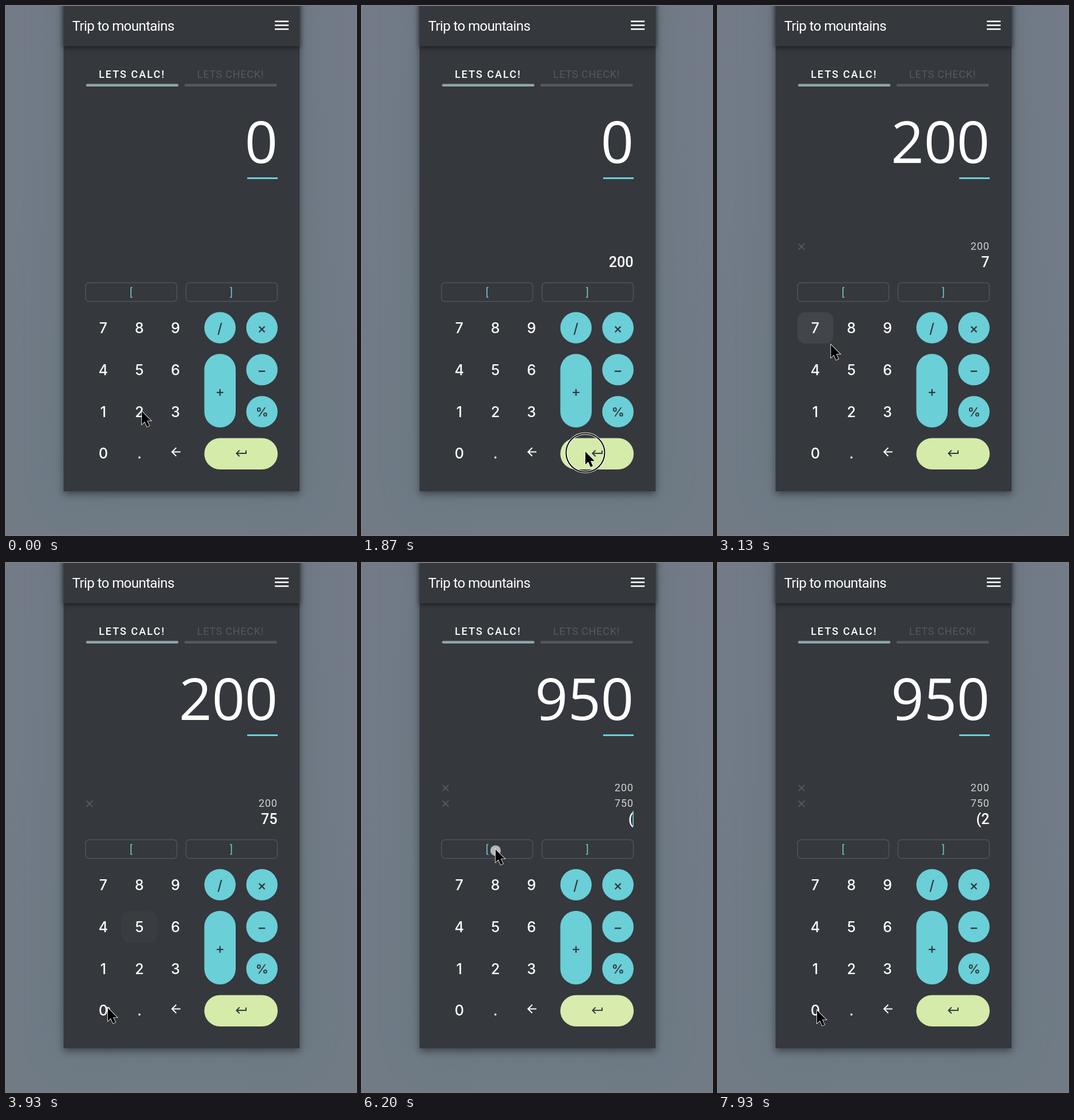
Write an HTML page that moves like this. It is 608 px wide and 920 px high and loops after 8 s.

```html
<!DOCTYPE html>
<html lang="en">
<head>
<meta charset="utf-8">
<title>Trip calculator</title>
<style>
html, body { margin: 0; width: 100%; height: 100%; overflow: hidden; }
body { position: relative; background: linear-gradient(#737b88, #707b86); }
.card, .head { position: absolute; left: 100px; width: 410px; background: #35383d; }
.card { top: -40px; height: 884px; box-shadow: 0 5px 12px rgba(0,0,0,.42), 0 4px 60px rgba(86,108,108,.4); }
.head { top: -20px; height: 90px; box-shadow: 0 2px 8px rgba(0,0,0,.55); }
svg { position: absolute; left: 0; top: 0; }
text { font-family: Roboto, sans-serif; fill: #fff; }
.title { font-size: 24px; letter-spacing: -.62px; }
.tab { font-size: 18px; font-weight: 500; letter-spacing: 2px; }
.off { font-weight: 400; letter-spacing: .7px; fill: #55595e; }
.big { font: 100px "Open Sans", sans-serif; }
.old { font-size: 18px; letter-spacing: 1px; fill: #d0d1d3; }
.entry { font-size: 25px; font-weight: 500; }
.num { font: 500 25px Inter, sans-serif; }
.op { font: 500 24px Inter, sans-serif; fill: #34373c; }
.pct { font-size: 22px; font-weight: 600; }
.mid { text-anchor: middle; }
.end { text-anchor: end; }
.paren { font-size: 18px; fill: #6acfd7; }
.frame { fill: none; stroke: #505359; stroke-width: 1.5; }
.cyan { fill: #6acfd7; }
.cross { stroke: #55585d; stroke-width: 2; }
</style>
</head>
<body>
<div class="card"></div>
<div class="head"></div>
<svg id="stage" width="608" height="920" viewBox="0 0 608 920">
  <text class="title" x="115" y="42.5">Trip to mountains</text>
  <path d="M467 26.8h24M467 33.5h24M467 40.2h24" stroke="#fff" stroke-width="2.5"/>

  <text class="tab mid" x="219" y="125">LETS CALC!</text>
  <text class="tab off mid" x="390" y="125">LETS CHECK!</text>
  <rect x="139" y="135.5" width="160.5" height="4.5" rx="2" fill="#90a4a9"/>
  <rect x="310" y="135.5" width="160.5" height="4.5" rx="2" fill="#55585d"/>

  <text class="big end" id="result" x="472" y="273"></text>
  <rect class="cyan" x="419" y="298" width="53" height="3"/>

  <g id="log"></g>
  <text class="entry end" id="entry" x="471.5" y="453.5"></text>
  <rect class="cyan" id="caret" x="470.2" y="431" width="1.6" height="27"/>

  <rect class="frame" x="138.2" y="481.2" width="158.6" height="32.6" rx="6"/>
  <rect class="frame" x="312.8" y="481.2" width="158.6" height="32.6" rx="6"/>
  <text class="paren mid" x="217.5" y="503.5">[</text>
  <text class="paren mid" x="391.5" y="503.5">]</text>

  <g id="nums"></g>
  <path fill="#fff" transform="translate(283 763.5)" d="M20 11H7.83l5.59-5.59L12 4l-8 8 8 8 1.41-1.41L7.83 13H20z"/>

  <g class="cyan">
    <circle cx="371.75" cy="559.5" r="27.25"/>
    <circle cx="444.6" cy="559.5" r="27.25"/>
    <circle cx="444.6" cy="632.5" r="27.25"/>
    <circle cx="444.6" cy="705.5" r="27.25"/>
    <rect x="344.5" y="605" width="54.5" height="128" rx="27.25"/>
  </g>
  <text class="op mid" x="371.5" y="568.5">/</text>
  <text class="op mid" x="444.6" y="568.5">×</text>
  <text class="op mid" x="444.6" y="641.5">−</text>
  <text class="op mid" x="371.7" y="678.5">+</text>
  <text class="op pct mid" x="444.8" y="714">%</text>
  <rect x="344.5" y="751.5" width="127.5" height="54.5" rx="27.25" fill="#d5eba9"/>
  <path fill="#34373c" transform="translate(397 766)" d="M19 7v4H5.83l3.58-3.59L8 6l-6 6 6 6 1.41-1.41L5.83 13H21V7z"/>

  <g id="ripples"></g>
  <g id="ring" fill="none">
    <circle r="33.5" stroke="#fff" stroke-width="4"/>
    <circle r="33.5" stroke="#0b0b0c" stroke-width="2"/>
  </g>
  <path id="pointer" d="M0 0V22.5L5 17.8 9 26.7 13 24.9 9 16.3H16Z" stroke="#fff" stroke-width="1.6" paint-order="stroke"/>
</svg>
<script>
const LOOP = 8000;
const $ = id => document.getElementById(id);

function add(parent, tag, attrs, text = '') {
  const el = document.createElementNS('http://www.w3.org/2000/svg', tag);
  for (const k in attrs) el.setAttribute(k, attrs[k]);
  el.textContent = text;
  return parent.appendChild(el);
}

// Number pad
['789', '456', '123', '0.'].forEach((row, r) =>
  [...row].forEach((ch, c) =>
    add($('nums'), 'text', { class: 'num mid', x: 169 + c * 62.7, y: 569 + r * 72.8 }, ch)));

// Earlier entries, oldest first
const log = ['200', '750'].map(value => {
  const row = add($('log'), 'g', {});
  add(row, 'text', { class: 'old end', x: 472, y: 424 }, value);
  add(row, 'path', { class: 'cross', d: 'M139.7 413.2l10.6 10.6M150.3 413.2l-10.6 10.6' });
  return row;
});

// Button areas: x, y, width, height, radius
const key = (c, r) => [138 + c * 62.7, 532.5 + r * 73, 62.5, 54.5, 14];
const ENTER = [344.5, 751.5, 127.5, 54.5, 27.25];
const OPEN = [138, 481, 159, 33, 6];

const clicks = [
  { down: 60, up: 185, at: [236, 705], area: key(1, 2), entry: '2' },
  { down: 935, up: 1045, at: [172, 778], area: key(0, 3), entry: '20' },
  { down: 1285, up: 1380, at: [172, 778], area: key(0, 3), entry: '200' },
  { down: 1850, up: 1960, at: [388, 775], area: ENTER, life: 950, entry: '' },
  { down: 2690, up: 2800, at: [172, 560], area: key(0, 0), entry: '7' },
  { down: 3440, up: 3547, at: [233, 633], area: key(1, 1), entry: '75' },
  { down: 3815, up: 3925, at: [177, 774], area: key(0, 3), entry: '750' },
  { down: 5320, up: 5430, at: [428, 774], area: ENTER, life: 950, entry: '' },
  { down: 6065, up: 6165, at: [232, 498], area: OPEN, life: 600, entry: '(' },
  { down: 7065, up: 7180, at: [236, 705], area: key(1, 2), entry: '(2' }
];

clicks.forEach((c, i) => {
  const [x, y, width, height, rx] = c.area;
  add(add($('ripples'), 'clipPath', { id: 'area' + i }), 'rect', { x, y, width, height, rx });
  const box = add($('ripples'), 'g', { 'clip-path': `url(#area${i})` });
  c.ripple = add(box, 'circle', { cx: c.at[0], cy: c.at[1] + 2, fill: '#fff' });
});

// Pointer moves: start, end, x, y
const moves = [
  [300, 880, 172, 778],
  [1440, 1800, 388, 775],
  [2010, 2540, 172, 560],
  [2920, 3410, 233, 633],
  [3575, 3810, 177, 774],
  [3990, 4660, 428, 774],
  [5530, 6050, 232, 498],
  [6300, 6960, 236, 705],
  [7300, 7930, 172, 778]
];

const clamp = v => Math.min(1, Math.max(0, v));
const ease = v => v * v * (3 - 2 * v);
const place = (el, x, y) => el.setAttribute('transform', `translate(${x} ${y})`);
const show = (el, on) => el.setAttribute('visibility', on ? 'visible' : 'hidden');

function draw(t) {
  let x = 236, y = 705;
  for (const [from, to, nx, ny] of moves) {
    const k = ease(clamp((t - from) / (to - from)));
    x += (nx - x) * k;
    y += (ny - y) * k;
  }
  place($('pointer'), x, y);

  let entry = '', sums = 0, pressed = false;
  for (const c of clicks) {
    const age = t - c.up, u = age / (c.life || 430);
    if (age >= 30) {
      entry = c.entry;
      if (c.area === ENTER) sums++;
    }
    if (t >= c.down && age < 0) pressed = true;
    const live = u >= 0 && u < 1;
    show(c.ripple, live);
    if (live) {
      c.ripple.setAttribute('r', 3 + age * .17);
      c.ripple.setAttribute('opacity', .7 * Math.pow(1 - u, 1.6));
    }
  }
  show($('ring'), pressed);
  place($('ring'), x, y + 2);

  $('entry').textContent = entry;
  $('result').textContent = ['0', '200', '950'][sums];
  log.forEach((row, i) => {
    show(row, i < sums);
    place(row, 0, -27.3 * (sums - 1 - i));
  });
  show($('caret'), t > 100 && (t + 930) % 1200 >= 600);
}

function tick() {
  draw(performance.now() % LOOP);
  requestAnimationFrame(tick);
}
tick();
</script>
</body>
</html>
```
